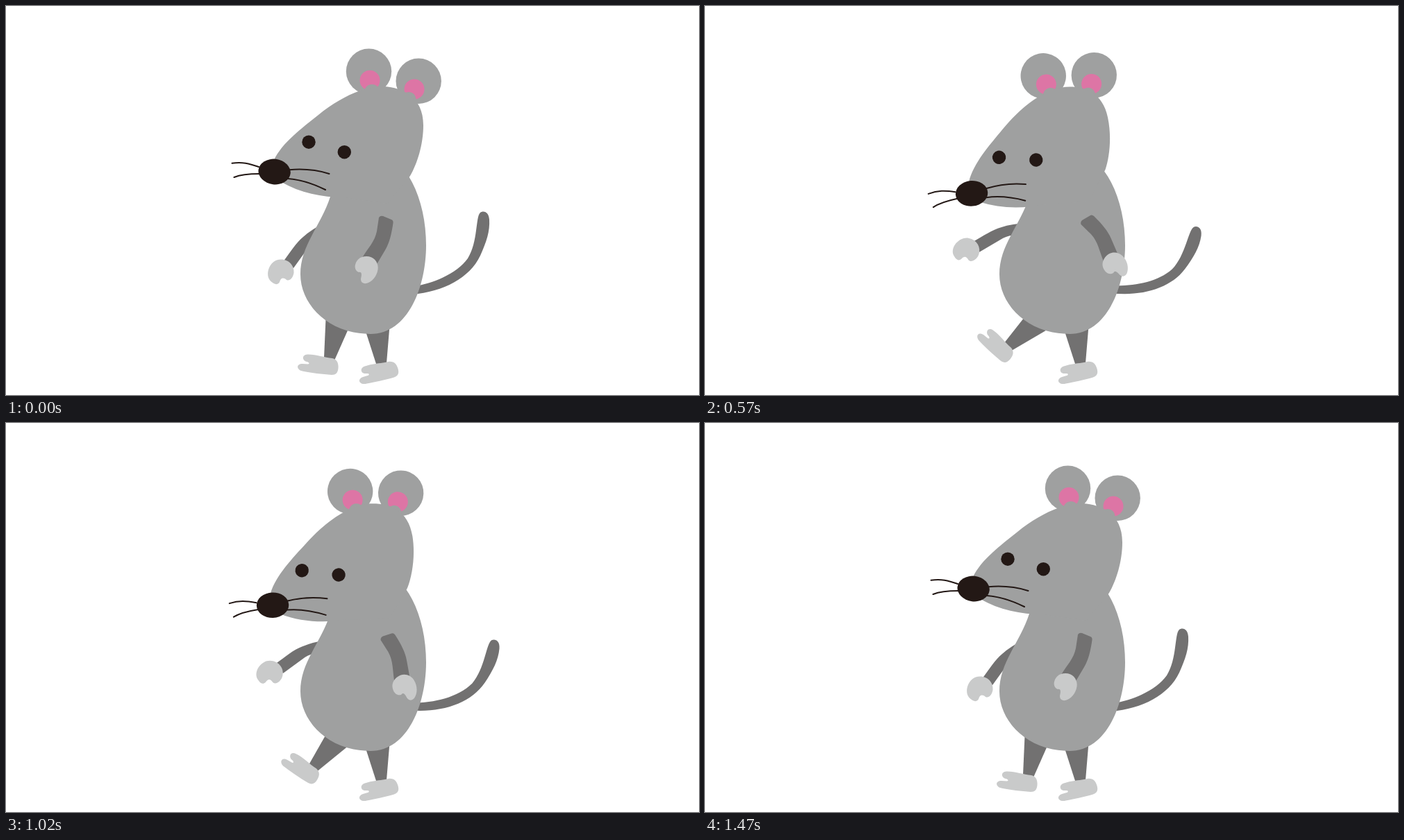
An HTML page that plays this animation: 998x561 px, repeating every 1.5 s.

```html
<!DOCTYPE html>
<html lang="en">
<head>
<meta charset="utf-8">
<title>Walking mouse</title>
<style>
html, body { margin: 0; width: 100%; height: 100%; overflow: hidden; background: #fff; }
svg { display: block; width: 100vw; height: 100vh; }
.fur { fill: #9fa0a0; }
.limb { fill: #727171; }
.paw { fill: #c9caca; }
.pink { fill: #dd75a5; }
.ink { fill: #231815; }
.hair { fill: none; stroke: #231815; stroke-width: 2; stroke-linecap: round; }
</style>
</head>
<body>
<svg viewBox="0 0 998 561" xmlns="http://www.w3.org/2000/svg">
  <defs>
    <path id="foot" class="paw" d="M470 508C477 510 479 515 478.5 522C478 529 475 532 469 532C455 531 440 529 429 527C418 526 417 516 427 516L435 516.5C438 515.5 436 513.5 433 513C426 511 426 503 434 502.5C446 502 458 507 470 508Z"/>
  </defs>

  <path id="tail" class="limb" d="M585 416C630 412 668 392 683 360C692 340 697 325 696 308C695 296 687 295 683 298C676 304 680 340 665 364C648 387 615 400 585 405Z"/>

  <g id="farArm">
    <path class="limb" d="M399 369C410 354 418 341 428 333Q440 322 462 311L466 327L452 334Q443 339 437 346L414 378Z"/>
    <path class="paw" d="M396 365.5C408 365.5 415.5 375 414.5 385C413 393 408 397 404 395C399 391 396 392 394 398C392 402 388 402 384 399C377 395 376 387 378 380C381 371 387 365.5 396 365.5Z"/>
  </g>

  <g id="leg">
    <path class="limb" d="M461 440L458 507L473 511L496 459Z"/>
    <use href="#foot"/>
  </g>
  <path class="limb" d="M515 460L533 516L548 515L553 455Z"/>
  <use href="#foot" transform="translate(86 11) rotate(-20 450 517)"/>

  <path class="fur" d="M574 237C594 263 605 304 605 345C605 405 579 473 525 473C464 473 424 430 424 387C424 345 453 318 467 275L480 262Z"/>

  <g id="head">
    <g class="fur">
      <circle cx="522.5" cy="94.3" r="32.7"/>
      <circle cx="594.2" cy="108.3" r="32.7"/>
    </g>
    <g class="pink">
      <circle cx="524" cy="107.2" r="14.5"/>
      <circle cx="588" cy="120" r="14.5"/>
    </g>
    <g class="fur">
      <circle cx="527" cy="124" r="11"/>
      <circle cx="580" cy="134.5" r="10.5"/>
      <path d="M386 222C398 197 425 177 450 157C480 133 515 115 545 116C570 118 601 130 601 172C601 200 592 228 582 245L550 285L485 276C455 276 422 269 395 253Z"/>
    </g>
    <g class="ink">
      <circle cx="436" cy="196.2" r="9.7"/>
      <circle cx="487.3" cy="210.7" r="9.7"/>
      <ellipse cx="386.6" cy="239" rx="23.2" ry="18.3" transform="rotate(7 386.6 239)"/>
    </g>
    <path class="hair" d="M325.5 226.7C340 224.5 350 227 364 232M328.5 247C338 243 350 242 365 242M408 236.3Q438 233.5 465.5 242M406 249Q432 251 460 265"/>
  </g>

  <g id="nearArm">
    <path class="limb" d="M537 305Q539 302 543 303L555 308Q558 309 557.5 313C555 330 552 342 546 352L533 374L511 366C522 348 531 340 534 325Q536 312 537 305Z"/>
    <path class="paw" d="M519 361C530 361 537 370 535.5 380C534 390 527 398 519 400C512 401 510 396 511.5 391C512.5 386 512 383 508 384C503 382 502 377 503 373C505 365 511 361 519 361Z"/>
  </g>
</svg>
<script>
const LOOP = 1500, STEP = 30, PEAK = 720, END = 1470;

// Each joint: element id, full swing in degrees, pivot
const joints = [
  ['head', -15, 536, 267],
  ['tail', 15, 594, 409],
  ['farArm', 30, 460, 322],
  ['nearArm', -68, 549, 305.5],
  ['leg', 45, 479, 455]
].map(([id, swing, x, y]) => ({ el: document.getElementById(id), swing, x, y }));

// Linear swing out and back, with a short rest
function phase(t) {
  return t < PEAK ? t / PEAK : Math.max(0, (END - t) / (END - PEAK));
}

function draw(ms) {
  const t = Math.floor((ms % LOOP) / STEP) * STEP;
  const p = phase(t);
  for (const { el, swing, x, y } of joints) {
    el.setAttribute('transform', `rotate(${swing * p} ${x} ${y})`);
  }
}

const start = performance.now();
function tick() {
  draw(performance.now() - start);
  requestAnimationFrame(tick);
}
tick();
</script>
</body>
</html>
```
